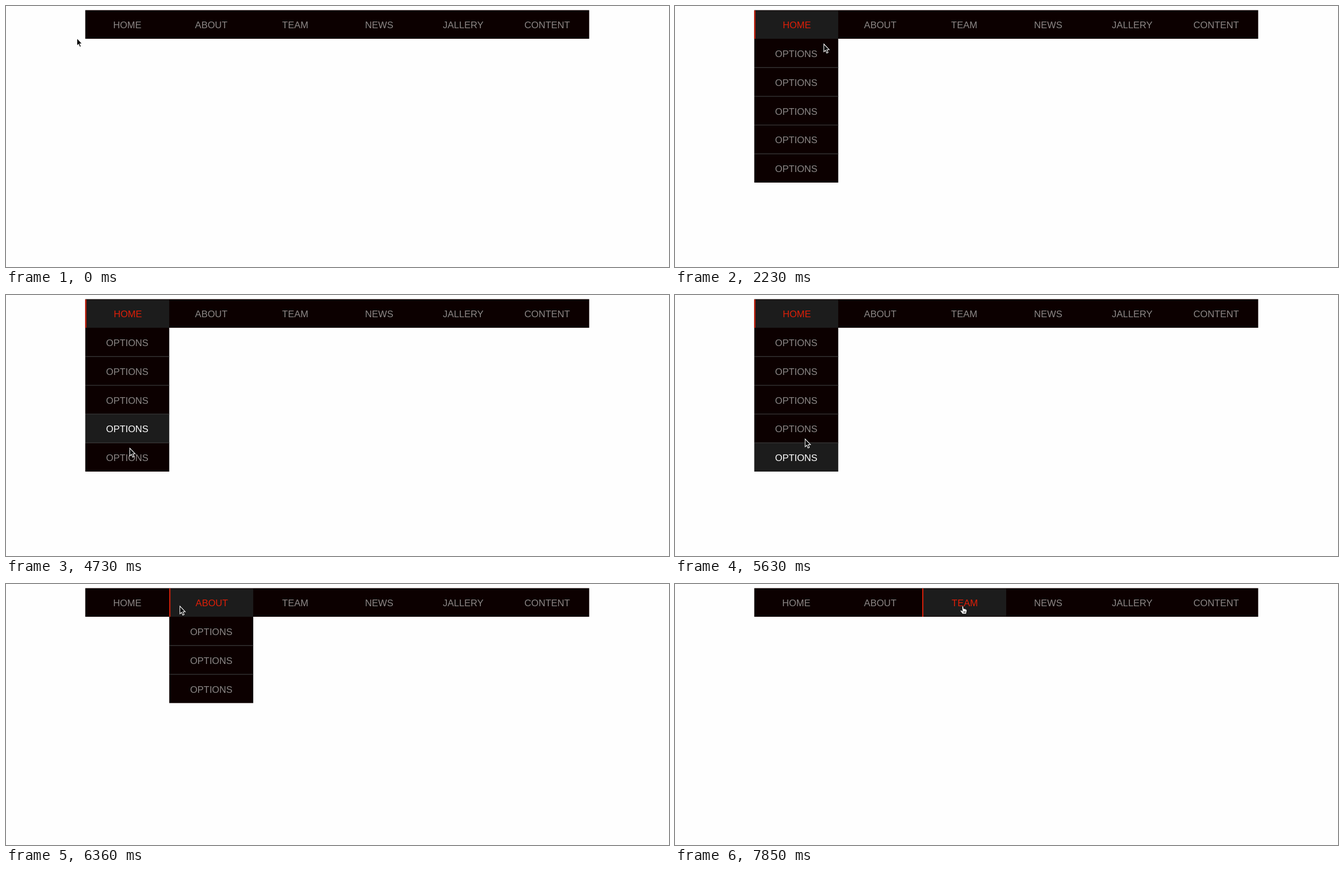
Write an HTML page that moves like this. It is 1191 px wide and 470 px high and loops after 7.99 s.

```html
<!DOCTYPE html>
<html lang="en">
<head>
<meta charset="utf-8">
<title>Dropdown menu</title>
<style>
  html, body { margin: 0; width: 100%; height: 100%; overflow: hidden; background: #fefefe; }
  svg { display: block; width: 100vw; height: 100vh; }
  text { font: 16.9px "Liberation Sans", Arial, sans-serif; text-anchor: middle; fill: #8c8887; }
  .bar, .row { fill: #0c0000; }
  .tab { fill: #1c1c1c; }
  .mark { fill: #df1f08; }
  .line { fill: #333; }
  .item .tab, .item .mark, .menu { visibility: hidden; }
  .item.on .tab, .item.on .mark, .item.on .menu { visibility: visible; }
  .item.on > text { fill: #df1f08; transform: translateX(1px); }
  .option.on .row { fill: #1c1c1c; }
  .option.on text { fill: #fff; }
</style>
</head>
<body>
<svg viewBox="0 0 1191 470">
  <g id="nav"></g>
  <g id="pointer">
    <path id="arrow" d="M0.4 0.8V14.8L3.4 12L5.6 17L8 16L5.8 11H10Z" fill="#000" stroke="#fff" stroke-width="1.1"/>
    <path id="hand" d="M-1.5 0.5Q0 -1.5 1 0.7L1.7 4.5Q3 3.6 3.8 5Q5.2 4.4 5.8 5.8Q7.6 5.6 7.4 8L6.2 14H-0.6L-4.5 8.6Q-4.8 6.7 -2.6 7.3L-0.8 8.8Z M2 9V12M4 9V12" fill="#fff" stroke="#000" stroke-width="0.9"/>
  </g>
</svg>
<script>
const LOOP = 7990, START = 590, STEP = 148;
const LEFT = 142.4, TOP = 7.5, BASE = 59, WIDTH = 150.87, ROW = 51.8;
const labels = ["HOME", "ABOUT", "TEAM", "NEWS", "JALLERY", "CONTENT"];
const optionCounts = { HOME: 5, ABOUT: 3 };

// Where the pointer rests or turns: step, x, y
const stops = [
  [0, 127, 57], [4, 238, 38], [8, 238, 38], [12, 267, 67.7], [21, 236, 157.5],
  [23, 231, 176], [24, 231, 176], [29, 222, 275], [31, 223, 305], [34, 223, 305],
  [37, 276, 95], [38, 289, 71], [40, 312, 39], [44, 366, 31], [46, 366, 31], [50, 517, 40]
];

function add(parent, tag, attrs, content = "") {
  const el = document.createElementNS("http://www.w3.org/2000/svg", tag);
  for (const key in attrs) el.setAttribute(key, attrs[key]);
  el.textContent = content;
  return parent.appendChild(el);
}

function box(parent, name, x, y, width, height) {
  return add(parent, "rect", { class: name, x, y, width, height });
}

const nav = document.getElementById("nav");
box(nav, "bar", LEFT, TOP, labels.length * WIDTH, BASE - TOP);

const items = labels.map((label, i) => {
  const x = LEFT + i * WIDTH, mid = x + WIDTH / 2, count = optionCounts[label] ?? 0;
  const el = add(nav, "g", { class: "item" });
  box(el, "tab", x, TOP + 1, WIDTH, BASE - TOP - (count ? 1 : 2));
  box(el, "mark", x, TOP + 0.5, 2, BASE - TOP - 0.5);
  add(el, "text", { x: mid, y: 39.6 }, label);
  const menu = add(el, "g", { class: "menu" });
  const options = Array.from({ length: count }, (_, r) => {
    const y = BASE + r * ROW, option = add(menu, "g", { class: "option" });
    box(option, "row", x, y, WIDTH, ROW);
    add(option, "text", { x: mid, y: y + 32.9 }, "OPTIONS");
    return option;
  });
  for (let r = 1; r < count; r++) box(menu, "line", x + 0.6, BASE + r * ROW - 0.7, WIDTH - 0.6, 1.4);
  return { el, options };
});

function slope(i, axis) {
  const a = stops[i], b = stops[i + 1];
  return a && b ? (b[axis] - a[axis]) / (b[0] - a[0]) : 0;
}

// Harmonic mean of the neighbouring slopes: zero at rests and turns.
function tangent(i, axis) {
  const a = slope(i - 1, axis), b = slope(i, axis);
  return a * b > 0 ? 2 * a * b / (a + b) : 0;
}

function locate(step) {
  const i = Math.max(0, stops.findIndex(s => s[0] >= step) - 1);
  const a = stops[i], b = stops[i + 1], span = b[0] - a[0], s = (step - a[0]) / span;
  const ease = s * s * (3 - 2 * s);
  return [1, 2].map(axis => a[axis] + (b[axis] - a[axis]) * ease
    + span * s * (1 - s) * (tangent(i, axis) * (1 - s) - tangent(i + 1, axis) * s));
}

// Hover state trails the pointer by one step.
function hover(step) {
  const [x, y] = locate(Math.max(0, step - 1));
  const item = Math.floor((x - LEFT) / WIDTH);
  const row = Math.floor((y - BASE) / ROW);
  const mid = LEFT + (item + 0.5) * WIDTH;
  const textY = row < 0 ? 34 : BASE + row * ROW + 27;
  const link = item >= 0 && Math.abs(x - mid) < 30 && Math.abs(y - textY) < 8;
  return { item, row, link };
}

const pointer = document.getElementById("pointer");
const arrow = document.getElementById("arrow");
const hand = document.getElementById("hand");

function draw() {
  const t = performance.now() % LOOP;
  const step = Math.min(50, Math.max(0, Math.floor((t - START) / STEP + 0.05) + 1));
  const [x, y] = locate(step), state = hover(step);
  items.forEach(({ el, options }, i) => {
    const on = i === state.item;
    el.classList.toggle("on", on);
    options.forEach((option, r) => option.classList.toggle("on", on && r === state.row));
  });
  pointer.setAttribute("transform", `translate(${x} ${y})`);
  arrow.style.display = state.link ? "none" : "";
  hand.style.display = state.link ? "" : "none";
  requestAnimationFrame(draw);
}
draw();
</script>
</body>
</html>
```
